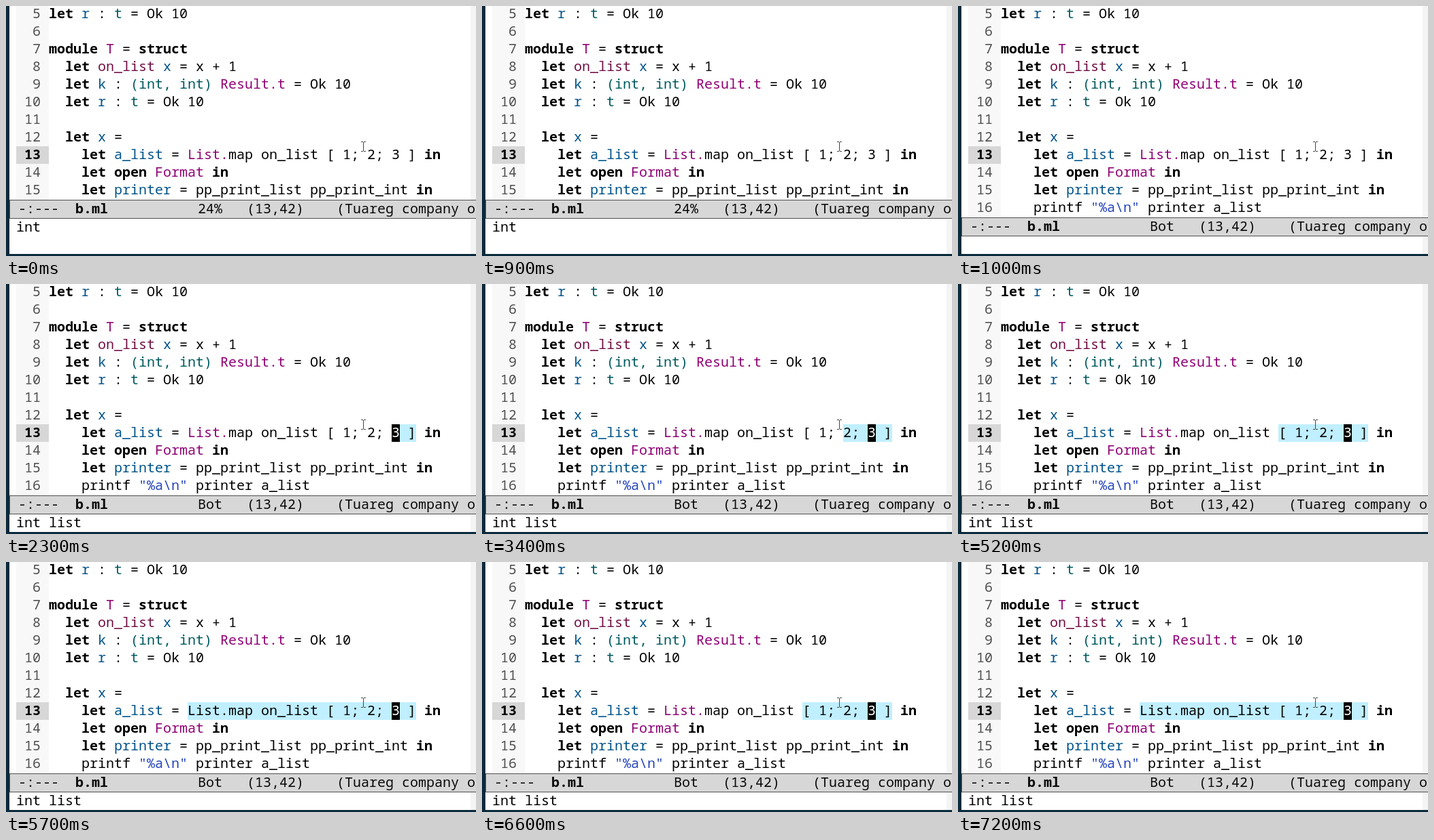
Animation, 691 px wide and 369 px high, one loop 8000 ms. Source, as an HTML page with a canvas:

```html
<!DOCTYPE html>
<html lang="en">
<head>
<meta charset="utf-8">
<title>Editor: growing type selection</title>
<style>
  html, body { margin: 0; overflow: hidden; background: #fff; }
  canvas { display: block; }
</style>
</head>
<body>
<canvas id="stage" width="691" height="369"></canvas>
<script>
const ctx = document.getElementById('stage').getContext('2d');
const COL = 12, ROW = 26, CODE_X = 63, FIRST_LINE = 5, ACTIVE = 13, CURSOR_COL = 42;
const BOLD = 'bold', PLAIN = 'normal';
const colors = { b: '#00538b', f: '#721045', m: '#8f0075', t: '#005a5f', s: '#2544bb' };

// {x:text} colours a piece of code; keywords become bold.
const code = [
  'let {b:r} : {t:t} = Ok 10',
  '',
  'module {m:T} = struct',
  '  let {f:on_list} {b:x} = x + 1',
  '  let {b:k} : {t:(int, int)} {m:Result.t} = Ok 10',
  '  let {b:r} : {t:t} = Ok 10',
  '',
  '  let {b:x} =',
  '    let {b:a_list} = {m:List.}map on_list [ 1; 2; 3 ] in',
  '    let open {m:Format} in',
  '    let {b:printer} = pp_print_list pp_print_int in',
  '    printf {s:"%a\\n"} printer a_list',
];
const tokenPattern = /\{(\w):(.*?)\}|\b(let|module|struct|open|in)\b|[^{\s]+?(?=[\s{]|$)|\s+/g;
const activeText = code[ACTIVE - FIRST_LINE].replace(/\{\w:(.*?)\}/g, '$1');

// [start time, first highlighted column]
const selections = [[0, 46], [2300, 42], [3400, 39], [3900, 34], [4600, 39],
  [5200, 34], [5700, 17], [6600, 34], [7200, 17]];
const SELECTION_END = 45;

function box(x, y, w, h, color) {
  ctx.fillStyle = color;
  ctx.fillRect(x, y, w, h);
}

function text(str, x, top, color = '#000', weight = PLAIN) {
  ctx.font = `${weight} 20px "Noto Sans Mono", "DejaVu Sans Mono", monospace`;
  ctx.fillStyle = color;
  ctx.fillText(str, x, top + 19);
}

const lineTop = n => 207 + (n - ACTIVE) * ROW;

function codeLine(source, top) {
  let x = CODE_X;
  for (const [all, kind, colored, keyword] of source.matchAll(tokenPattern)) {
    const str = colored || all;
    text(str, x, top, colors[kind], keyword ? BOLD : PLAIN);
    x += str.length * COL;
  }
}

function selection(t) {
  const start = selections.findLast(([from]) => t >= from)[1];
  const top = lineTop(ACTIVE), x = CODE_X + start * COL;
  if (start < SELECTION_END) {
    box(x, top, (SELECTION_END - start) * COL, ROW, '#c0efff');
    text(activeText.slice(start, SELECTION_END), x, top);
  }
  if ((t >= 400 && t < 900) || t >= 1200) {
    const cursorX = CODE_X + CURSOR_COL * COL;
    box(cursorX, top, COL, ROW, '#000');
    text(activeText[CURSOR_COL], cursorX, top, '#fff');
  }
}

function pointer() {
  box(525, 201, 1, 13, '#444');
  for (const y of [200, 214]) {
    box(522, y, 3, 1, '#444');
    box(526, y, 3, 1, '#444');
  }
}

function modeLine(top, position) {
  box(5, top, 686, 28, '#505050');
  box(6, top + 1, 685, 26, '#d7d7d7');
  const put = (str, col, weight) => text(str, 18 + col * COL, top + 1, '#0a0a0a', weight);
  put('-:---', 0);
  put('b.ml', 7, BOLD);
  put(position, 22);
  put('(13,42)', 28);
  put('(Tuareg company o', 39);
}

function draw(t) {
  const tallEcho = t < 1000;
  const modeTop = tallEcho ? 286 : 312;
  const message = tallEcho || (t >= 1200 && t < 2300) ? 'int' : t >= 2300 ? 'int list' : '';

  box(0, 0, 691, 369, '#0a2a3c');
  box(5, 0, 686, 366, '#fff');
  box(15, 0, 48, modeTop, '#f8f8f8');
  box(683, 0, 8, 366, '#f4f4f4');
  box(15, lineTop(ACTIVE), 48, ROW, '#d7d7d7');

  code.forEach((source, i) => {
    const n = FIRST_LINE + i, top = lineTop(n), active = n === ACTIVE;
    if (top + ROW > modeTop) return;
    text(String(n).padStart(3), 15, top, active ? '#000' : '#505050', active ? BOLD : PLAIN);
    codeLine(source, top);
  });
  selection(t);
  pointer();
  modeLine(modeTop, tallEcho ? '24%' : 'Bot');
  text(message, 15, modeTop + 28);
}

function tick() {
  draw(performance.now() % 8000);
  requestAnimationFrame(tick);
}
tick();
</script>
</body>
</html>
```
